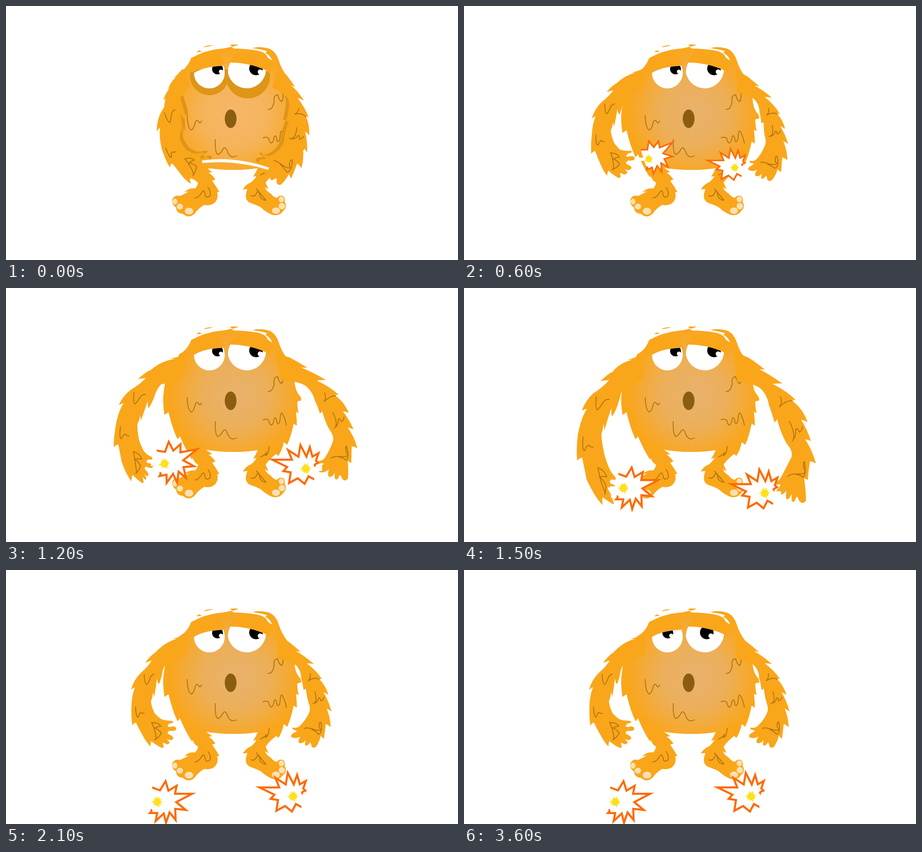
Write an HTML page with a canvas that moves like this. It is 998 by 561 pixels and loops after 3.9 s.

```html
<!DOCTYPE html>
<html lang="en">
<head>
<meta charset="utf-8">
<title>Furry monster</title>
<style>
html, body { margin: 0; width: 100%; height: 100%; overflow: hidden; background: #fff; }
canvas { display: block; }
</style>
</head>
<body>
<canvas id="stage" width="998" height="561"></canvas>
<script>
const ctx = document.getElementById('stage').getContext('2d');
const ORANGE = '#faa61a', LINE = '#b17612', SHADE = '#de9518';
const STEP = 300, STEPS = 13;

const BODY = new Path2D(`M409,115Q440,98 470,95Q490,93 497,90L503,94Q545,95 563,101Q575,105 577,113
Q583,119 588,120Q583,108 572,103Q578,102 575,99Q560,95 545,93Q560,88 583,95Q597,103 602,120
Q608,140 622,158L637,205Q638,228 650,240L652,248Q646,249 643,251Q643,265 646,276L640,273
Q642,290 642,304L635,299Q630,325 621,346L613,340Q610,358 601,371L597,366Q583,376 573,390
L579,404L571,400Q574,408 585,415Q590,422 598,424Q604,417 612,420Q617,424 615,433Q620,440 616,448
Q610,455 608,457Q600,464 588,461Q575,456 562,444Q550,438 540,435Q528,430 530,415L533,404L523,405
Q530,394 542,389Q552,380 553,375L546,377Q552,368 556,358Q530,362 505,362Q470,362 441,357
L455,367L447,368Q456,374 462,383L455,386Q464,398 471,411L466,411Q470,425 460,435Q450,442 438,439
Q425,446 416,459Q403,470 391,459Q376,458 376,445Q366,440 367,428Q372,416 384,420Q395,415 405,409
L394,411Q405,401 418,403Q424,396 424,390Q415,385 412,374L411,379Q398,360 384,327L379,334
Q368,312 359,274L350,280Q345,250 349,225L352,205L383,146Q400,138 409,115Z
M420,102L427,98L432,101ZM436,91Q446,86 457,87L443,90ZM495,86Q505,84 513,86L500,90Z`);

const BROWS = new Path2D(`M408,148L412,115Q450,100 470,107L485,128Q440,132 408,148Z
M490,126L508,104Q560,100 590,125L582,148Q540,124 490,126Z`);

const BODY_LINES = new Path2D(`M400,242Q401,270 409,274Q414,273 418,257Q422,248 426,257Q429,260 432,254
M462,295Q461,325 468,328Q474,326 480,315Q485,309 490,324Q497,338 509,331
M608,182Q615,200 609,211Q602,208 600,196Q590,196 592,212Q588,230 579,228
M568,291Q574,288 580,292Q582,302 586,303Q591,300 592,289Q597,282 598,297Q602,304 605,292Q606,272 610,277Q617,290 619,303
M581,350Q580,368 573,370L575,364Q567,372 562,373
M417,424Q425,424 432,412Q438,402 440,419Q443,425 450,420Q454,411 446,401
M541,419Q549,423 554,412Q558,404 561,421Q565,428 572,429M553,404Q566,420 574,429`);

const TOES = [[373, 432, 5.5, 6.5], [384, 443, 7, 6.5], [404, 453, 9.5, 7.5],
  [608, 427, 6, 6.5], [609, 442, 7, 7], [596, 452, 9, 7]];

const EYES = [
  { lid: new Path2D('M415,148Q436,134 480,132Q483,140 483,148A34,34 0 0 1 415,148Z'), x: 467, y: 139, r: 12 },
  { lid: new Path2D('M495,125Q537,125 574,142A42.5,42.5 0 0 1 490,148Q490,135 495,125Z'), x: 552, y: 138, r: 15 }
];

// Each arm is drawn once; its pins move from the rest pose to the other poses.
const ARMS = [
  {
    shape: `M400,140Q384,148 368,152L377,152Q350,160 330,182Q320,188 307,205Q314,202 322,200Q313,214 298,227
Q282,242 276,265Q280,261 285,259Q278,275 277,300Q276,325 279,344Q282,338 287,337Q292,348 300,362
Q308,378 319,390Q319,382 321,378Q330,386 344,393Q350,393 347,385Q345,381 349,382Q357,388 361,382
Q361,378 354,373Q366,379 369,372Q371,368 358,362Q354,358 362,355Q374,357 376,351Q375,344 365,346
Q358,348 357,344Q358,339 367,338Q372,336 366,333Q350,333 342,329Q333,322 328,316Q321,302 320,290
Q324,280 325,270L327,281Q331,262 333,240Q335,250 338,252Q343,240 346,222Q349,212 356,205Q380,200 400,185Z`,
    lines: `M305,231Q306,252 311,253Q314,250 319,237Q321,232 327,230M286,303Q287,326 292,325
Q295,314 298,315Q301,318 305,316M321,337Q336,336 342,345Q333,346 329,349Q337,352 343,360Q338,370 328,375M322,337Q332,360 331,374`,
    poses: {
      up: [385,160, 347,208, 333,277, 362,244, 362,325, 362,357, 408,349, 408,392, 447,338, 394,250],
      snap: [385,155, 315,190, 282,249, 320,226, 297,298, 281,327, 333,341, 316,374, 376,337, 342,240],
      wide: [380,165, 295,197, 252,246, 295,232, 260,298, 240,322, 287,343, 262,374, 328,348, 316,247],
      low: [380,168, 301,206, 260,271, 302,255, 268,347, 250,382, 302,422, 306,478, 333,442, 326,283],
      rest: [385,160, 307,205, 276,265, 315,241, 292,316, 279,344, 332,352, 319,389, 375,351, 337,252]
    }
  },
  {
    shape: `M600,140Q615,155 622,157Q634,166 651,181L640,179Q660,190 680,208Q671,206 664,206Q685,222 698,241
L690,239Q706,255 712,276Q706,272 701,270Q712,288 719,313Q713,308 708,306Q716,325 717,347
Q711,342 706,340Q704,358 702,373Q698,370 695,366Q691,382 684,391Q677,395 674,388Q674,383 671,381
Q664,392 660,386Q660,380 662,376Q652,386 646,381Q645,376 650,368Q640,374 630,369Q627,364 637,359
Q644,355 641,354Q630,353 633,348Q642,350 648,345Q660,334 668,318Q674,308 668,293Q664,280 662,262
L657,265Q655,250 652,240Q652,222 640,210Q625,200 600,195Z`,
    lines: `M672,229Q673,240 667,245Q680,236 692,241M682,269Q688,290 680,294Q688,293 690,283
Q694,281 695,289Q700,288 702,281M659,350Q664,347 676,351Q690,356 695,353Q689,345 693,336
M695,336Q700,360 690,363Q684,356 675,352`,
    poses: {
      up: [605,155, 658,209, 669,246, 650,237, 645,286, 665,323, 612,350, 630,381, 558,344, 600,395, 612,300],
      snap: [612,162, 680,203, 698,238, 679,236, 687,277, 716,305, 675,347, 700,367, 628,361, 673,387, 665,298],
      wide: [612,165, 695,195, 722,223, 703,232, 721,268, 755,287, 728,332, 752,349, 680,355, 735,376, 705,292],
      low: [612,165, 703,211, 732,246, 710,252, 732,312, 766,338, 740,408, 759,424, 690,456, 748,476, 722,360],
      rest: [610,165, 680,208, 698,240, 678,239, 690,283, 719,313, 680,350, 702,373, 630,368, 678,393, 670,305]
    }
  }
];

// from, to, blend, outward shift
const MOVES = [['up', 'up', 0, 0], ['up', 'snap', .5, 0], ['snap', 'snap', 0, 0], ['wide', 'wide', 0, 0],
  ['wide', 'low', .5, 7], ['low', 'low', 0, 0], ['wide', 'low', .8, 10], ['rest', 'rest', 0, 0]];

const BURSTS = [
  { edge: `M-11,-34L5,-28L19,-51L26,-28L46,-40L42,-20L86,-20L46,1L70,21L42,18L43,47L28,28L19,54L13,30L-7,49
L-3,27L-21,27L-15,20`, tail: -30, turn: -22 },
  { edge: `M18,26L7,20L-2,37L-18,24L-40,36L-36,10L-54,7L-45,-3L-84,-22L-34,-22L-44,-47L-18,-30L-13,-59
L1,-32L9,-55L16,-30L32,-39L25,-18L31,-12L22,-8`, tail: 36, turn: 0 }
].map(b => ({ ...b, edge: new Path2D(b.edge), area: new Path2D(b.edge + 'Z') }));

// left core, right core, size
const SPARKS = [null, [455, 340, 555, 357, .5], [408, 338, 598, 357, .81], [347, 335, 659, 345, 1],
  [350, 388, 662, 399, 1], [352, 442, 664, 453, 1], [334, 512, 634, 500, 1]];

// pupil shifts for the last steps
const GLANCES = { 9: [0, 2], 10: [-1, 4], 11: [-8, -6], 12: [-17, -16] };

const clampGet = (list, i) => list[Math.min(i, list.length - 1)];

function fill(path, color) {
  ctx.fillStyle = color;
  ctx.fill(path);
}

function stroke(path, color, width) {
  ctx.strokeStyle = color;
  ctx.lineWidth = width;
  ctx.stroke(path);
}

function oval(x, y, rx, ry, color) {
  ctx.beginPath();
  ctx.ellipse(x, y, rx, ry, 0, 0, 7);
  ctx.fillStyle = color;
  ctx.fill();
}

function layer(draw) {
  ctx.save();
  draw();
  ctx.restore();
}

function clipBox(x, y, w, h) {
  ctx.beginPath();
  ctx.rect(x, y, w, h);
  ctx.clip();
}

// Moving least squares: a weighted turn, scale and shift around the pins.
function warp(p, q, x, y) {
  const weights = [];
  let sum = 0, px = 0, py = 0, qx = 0, qy = 0;
  for (let i = 0; i < p.length; i += 2) {
    const w = ((p[i] - x) ** 2 + (p[i + 1] - y) ** 2 + 1) ** -1.5;
    weights.push(w);
    sum += w;
    px += w * p[i]; py += w * p[i + 1];
    qx += w * q[i]; qy += w * q[i + 1];
  }
  px /= sum; py /= sum; qx /= sum; qy /= sum;
  let a = 0, b = 0, norm = 0;
  weights.forEach((w, k) => {
    const i = 2 * k;
    const ux = p[i] - px, uy = p[i + 1] - py, vx = q[i] - qx, vy = q[i + 1] - qy;
    a += w * (ux * vx + uy * vy);
    b += w * (ux * vy - uy * vx);
    norm += w * (ux * ux + uy * uy);
  });
  a /= norm; b /= norm;
  const dx = x - px, dy = y - py;
  return `${(qx + a * dx - b * dy).toFixed(2)},${(qy + b * dx + a * dy).toFixed(2)}`;
}

function poseArm(arm, side, [from, to, k, out]) {
  const a = arm.poses[from], b = arm.poses[to];
  const pins = a.map((v, i) => v + (b[i] - v) * k + (i > 1 && i % 2 === 0 ? out * side : 0));
  const bend = path => new Path2D(path.replace(/(\d+),(\d+)/g, (_, x, y) => warp(arm.poses.rest, pins, +x, +y)));
  return { shape: bend(arm.shape), lines: bend(arm.lines) };
}

const POSES = MOVES.map(move => ARMS.map((arm, i) => poseArm(arm, i ? 1 : -1, move)));

function drawBody(start) {
  fill(BODY, ORANGE);
  const glow = ctx.createRadialGradient(510, 238, 15, 505, 235, 145);
  glow.addColorStop(0, start ? '#f5b666' : '#e9b16a');
  glow.addColorStop(.45, start ? '#f5b45b' : '#ecaf59');
  glow.addColorStop(1, ORANGE);
  fill(BODY, glow);
  if (start) layer(() => {
    clipBox(400, 140, 190, 70);
    oval(449, 154, 43, 43, SHADE);
    oval(534, 155, 49, 49, SHADE);
  });
  fill(BROWS, ORANGE);
  stroke(BODY_LINES, LINE, 2);
  oval(496, 249, 13, 20.5, '#8b5e0f');
  TOES.forEach(toe => oval(...toe, '#fbe0b2'));
}

function drawEyes(glance) {
  EYES.forEach((eye, i) => layer(() => {
    const x = eye.x + glance[i];
    fill(eye.lid, '#fff');
    ctx.clip(eye.lid);
    oval(x, eye.y, eye.r, eye.r, '#000');
    oval(x + eye.r * .62, eye.y + eye.r * .5, eye.r * .37, eye.r * .37, '#fff');
  }));
}

function drawArms(arms, start) {
  if (start) layer(() => {
    clipBox(340, 198, 320, 150);
    arms.forEach((arm, i) => layer(() => {
      ctx.translate(i ? -7 : 7, -4);
      fill(arm.shape, SHADE);
    }));
  });
  for (const arm of arms) {
    fill(arm.shape, ORANGE);
    stroke(arm.lines, LINE, 2);
  }
}

function drawBurst(burst, x, y, size, turn) {
  layer(() => {
    ctx.translate(x, y);
    ctx.scale(size, size);
    ctx.fillStyle = '#fff';
    ctx.fillRect(0, -4, burst.tail, 9);
    ctx.rotate(turn * Math.PI / 180);
    layer(() => {
      ctx.clip(burst.area);
      fill(burst.area, '#fff');
      stroke(burst.edge, '#ff6a00', 9);
    });
    ctx.beginPath();
    for (let i = 0; i < 20; i++) {
      const r = i % 2 ? 7.5 : 12 + 2 * Math.sin(i * 2), a = i * Math.PI / 10;
      ctx.lineTo(r * Math.cos(a), r * Math.sin(a));
    }
    ctx.fillStyle = '#ffe01b';
    ctx.fill();
  });
}

function draw(now) {
  const step = Math.floor(now / STEP) % STEPS, start = step === 0;
  ctx.fillStyle = '#fff';
  ctx.fillRect(0, 0, 998, 561);
  ctx.lineCap = 'round';
  drawBody(start);
  drawArms(clampGet(POSES, step), start);
  drawEyes(GLANCES[step] || [0, 0]);
  if (start) fill(new Path2D('M433,341Q505,331 581,357L579,362Q505,339 433,347Z'), '#fff');
  const spark = clampGet(SPARKS, step);
  if (spark) BURSTS.forEach((burst, i) =>
    drawBurst(burst, spark[2 * i], spark[2 * i + 1], spark[4], step < 4 ? burst.turn : step === 4 ? burst.turn / 2 : 0));
  requestAnimationFrame(draw);
}

requestAnimationFrame(draw);
</script>
</body>
</html>
```
